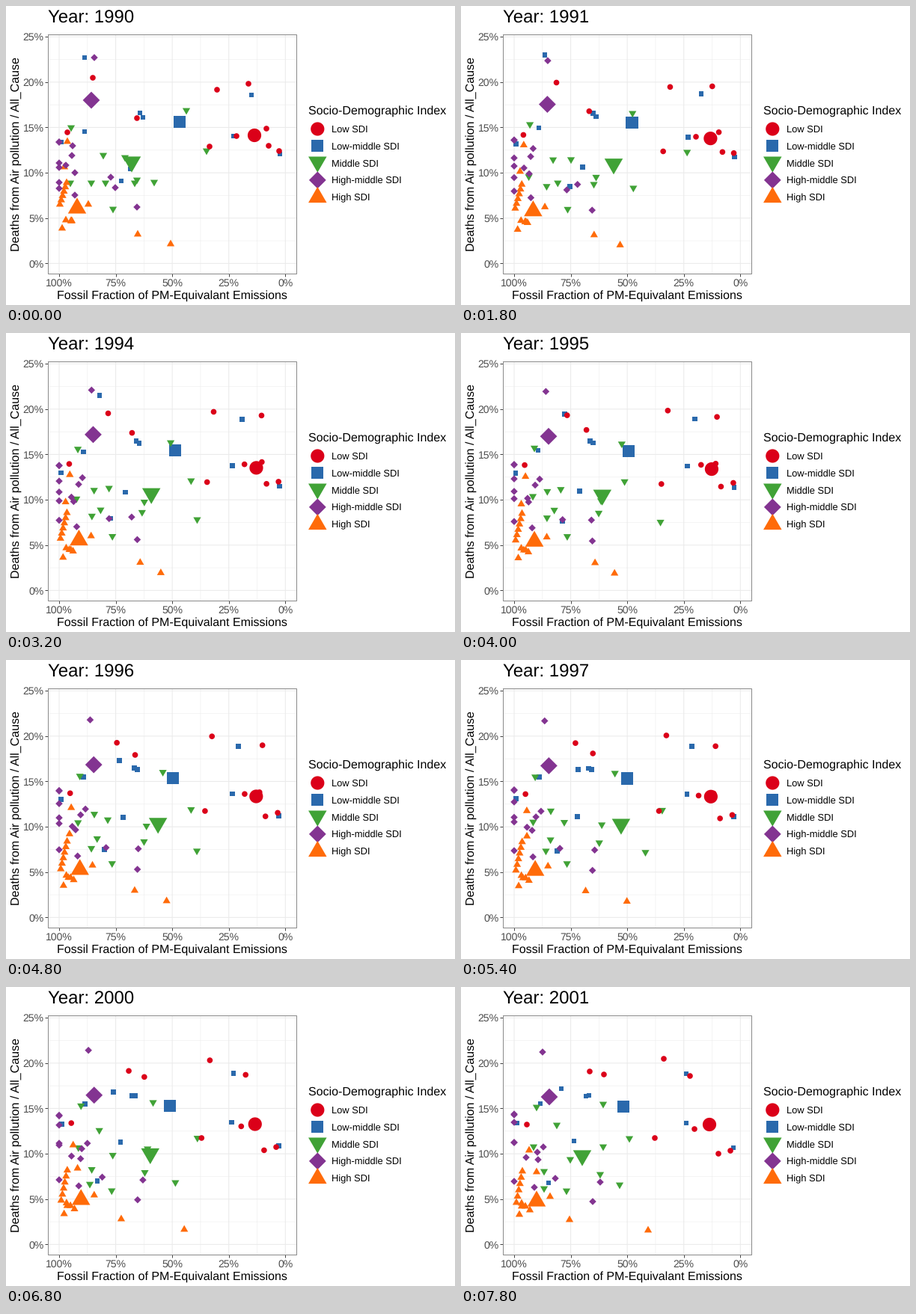
A matplotlib script that plays this animation: 600 px wide and 400 px high, repeating every 8 s.

```python
import matplotlib.pyplot as plt
import numpy as np
from matplotlib.animation import FuncAnimation
from matplotlib.collections import PolyCollection

W, H, DPI = 600, 400, 100
FRAMES, INTERVAL = 40, 200
BIG, SMALL = 9.1, 3.8

plt.rcParams.update({"font.family": "Liberation Sans", "text.hinting": "no_hinting"})
fig = plt.figure(figsize=(W / DPI, H / DPI), dpi=DPI, facecolor="white")
ax = fig.add_axes([0, 0, 1, 1])
ax.axis("off")


def polygon(n, turn=0.0):
    """Regular polygon with its first corner on top, centred in its box."""
    a = np.linspace(0, 2 * np.pi, n, endpoint=False) + turn
    pts = np.column_stack([np.sin(a), -np.cos(a)])
    return pts - (pts.max(axis=0) + pts.min(axis=0)) / 2


# Outlines scaled so that all marks cover a similar area
CIRCLE = polygon(48)
SQUARE = polygon(4, np.pi / 4) * 1.253
DIAMOND = polygon(4) * 1.253
UP = polygon(3) * 1.555
DOWN = UP * (1, -1)


class Group:
    def __init__(self, label, color, shape):
        self.label, self.color, self.shape = label, color, shape
        self.paths = []

    def move(self, *points, size=SMALL):
        """Pass through the points at equal steps of the loop."""
        times = np.linspace(0, FRAMES - 1, len(points))
        self.paths.append((times, *np.transpose(points), size))

    def outlines(self, frame):
        return [self.shape * size + (np.interp(frame, t, x), np.interp(frame, t, y))
                for t, x, y, size in self.paths]


low = Group("Low SDI", "#db0019", CIRCLE)
lowmid = Group("Low-middle SDI", "#2a69ac", SQUARE)
mid = Group("Middle SDI", "#40a236", DOWN)
highmid = Group("High-middle SDI", "#833491", DIAMOND)
high = Group("High SDI", "#ff6b09", UP)

low.move((116, 96), (141, 110), (172, 113))
low.move((175, 150), (167, 130), (191, 117))
low.move((282, 112), (271, 96))
low.move((324, 104), (341, 109), (343, 115), (306, 119))
low.move((82, 169), (88, 184))
low.move((308, 174), (321, 176), (312, 190))
low.move((272, 188), (268, 202), (259, 202))
low.move((348, 164), (333, 185))
low.move((351, 187), (344, 223))
low.move((365, 194), (364, 200), (360, 219))
low.move((332, 173), (335, 182), (332, 184), size=BIG)

lowmid.move((105, 69), (115, 64), (158, 147), (134, 136))
lowmid.move((105, 168), (103, 157), (106, 156))
lowmid.move((179, 143), (167, 146))
lowmid.move((183, 149), (171, 145))
lowmid.move((328, 119), (313, 115), (301, 116))
lowmid.move((304, 174), (301, 182))
lowmid.move((74, 182), (73, 188), (75, 182))
lowmid.move((154, 234), (136, 251), (117, 262))
lowmid.move((366, 198), (364, 215))
lowmid.move((166, 218), (151, 206))
lowmid.move((232, 155), (217, 160), size=BIG)

mid.move((87, 164), (98, 155), (101, 162))
mid.move((241, 141), (190, 158))
mid.move((268, 195), (305, 197), (215, 200), (285, 203), (225, 204))
mid.move((130, 201), (115, 214), (128, 186))
mid.move((159, 204), (133, 210), (146, 232))
mid.move((86, 238), (96, 220), (97, 215))
mid.move((114, 238), (115, 248), (111, 271))
mid.move((133, 238), (125, 238), (111, 248))
mid.move((172, 238), (184, 242), (186, 252))
mid.move((175, 234), (187, 226), (190, 215))
mid.move((198, 237), (268, 254), (212, 266))
mid.move((143, 273), (141, 274))
mid.move((168, 212), (207, 215), (187, 220), (222, 224), (162, 229), size=BIG)

high.move((82, 180), (86, 190), (91, 217))
high.move((78, 214), (80, 227), (101, 246))
for i in range(6):
    high.move((81 - 1.8 * i, 235 + 5.8 * i), (82 - 1.6 * i, 245 + 8.4 * i))
high.move((110, 264), (119, 279))
high.move((80, 285), (81, 288))
high.move((87, 286), (81, 292))
high.move((88, 286), (92, 297))
high.move((87, 286), (86, 292))
high.move((75, 296), (78, 303))
high.move((176, 304), (180, 306), (145, 310))
high.move((220, 317), (204, 320), (250, 324))
high.move((95, 267), (101, 283), size=BIG)

# Places that stay at 100%
for start, end in ((182, 170), (182, 171), (210, 181), (216, 208), (236, 208), (244, 260)):
    highmid.move((71, start), (71, end))
highmid.move((118, 69), (109, 87))
highmid.move((89, 187), (105, 195), (110, 214))
highmid.move((88, 200), (99, 203), (102, 221))
highmid.move((80, 213), (89, 221), (87, 228))
highmid.move((92, 223), (90, 226), (103, 231))
highmid.move((92, 253), (98, 268))
highmid.move((146, 243), (126, 256))
highmid.move((140, 229), (174, 250), (186, 261))
highmid.move((175, 269), (176, 287))
highmid.move((114, 126), (117, 138), (118, 147), size=BIG)


def px(size):
    return size * 72 / DPI


def line(xs, ys, color, width=1.0, z=1, snap=True):
    ax.plot(xs, ys, color=color, lw=px(width), zorder=z, snap=snap,
            solid_capstyle="butt")


def text(x, y, words, size, color="black", **kw):
    return ax.text(x, y, words, fontsize=px(size), color=color, va="baseline", **kw)


LEFT, RIGHT, TOP, BOTTOM = 56, 388, 38, 358
GRID, TICK, GREY = "#ebebeb", "#444444", "#4d4d4d"


def col(percent):
    return 373.3 - 3.023 * percent


def row(percent):
    return 344.4 - 12.128 * percent


def grid_x(p, width):
    line([col(p)] * 2, [TOP, BOTTOM], GRID, width, snap=False)


def grid_y(p, width):
    line([LEFT, RIGHT], [row(p)] * 2, GRID, width, snap=False)


for p in range(0, 101, 25):
    grid_x(p, 1.07)
    line([col(p)] * 2, [BOTTOM, BOTTOM + 4], TICK)
    text(col(p), 375, f"{p}%", 14, GREY, ha="center")
    if p < 100:
        grid_x(p + 12.5, 0.53)
for p in range(0, 26, 5):
    grid_y(p, 1.07)
    line([LEFT - 4, LEFT], [row(p)] * 2, TICK)
    text(50.5, row(p) + 5, f"{p}%", 14, GREY, ha="right")
    if p < 25:
        grid_y(p + 2.5, 0.53)
line([LEFT, RIGHT, RIGHT, LEFT, LEFT], [TOP, TOP, BOTTOM, BOTTOM, TOP], "#8a8a8a", z=8)

title = text(55.5, 22.6, "", 24)
text(222, 392, "Fossil Fraction of PM-Equivalant Emissions", 16, ha="center")
text(17.5, 198.5, "Deaths from Air pollution / All_Cause", 16, ha="center",
     rotation=90, rotation_mode="anchor")
text(404.5, 144.5, "Socio-Demographic Index", 16)

for i, g in enumerate((low, lowmid, mid, highmid, high)):
    y = 164.5 + 22.8 * i
    # Triangles hang from their centroid, not from the middle of their box
    lean = {"Middle SDI": 2, "High SDI": -3.2}.get(g.label, 0)
    ax.fill(*(g.shape * BIG + (416.3, y + lean)).T, color=g.color, lw=0)
    text(435, y + 4.6, g.label, 12.9)

layers = []
for z, g in enumerate((lowmid, mid, high, highmid, low), start=2):
    layer = PolyCollection([], facecolors=g.color, edgecolors="none", zorder=z)
    ax.add_collection(layer, autolim=False)
    layers.append((g, layer))
ax.set(xlim=(0, W), ylim=(H, 0))


def update(frame):
    year = max(1990, int(1988.88 + 0.33 * frame))
    title.set_text(f"Year: {year}")
    for g, layer in layers:
        layer.set_verts(g.outlines(frame))
    return [title] + [layer for _, layer in layers]


anim = FuncAnimation(fig, update, frames=FRAMES, interval=INTERVAL,
                     init_func=lambda: update(0), repeat=True, repeat_delay=0)
plt.show()
```
